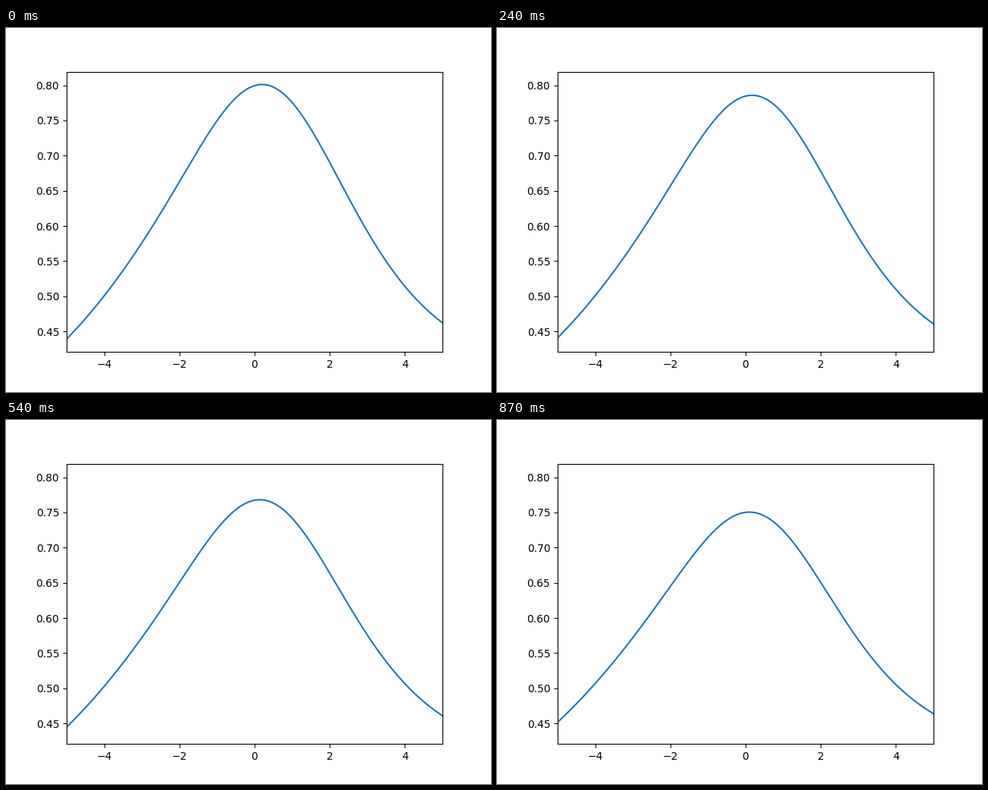
Recreate the animation shown at these times as a matplotlib script. Size 640 px wide and 480 px high, loop 0.9 s.

```python
import numpy as np
import matplotlib.pyplot as plt
from matplotlib.animation import FuncAnimation

FRAMES = 30


def curve(x, t):
    """Bell with slow tails that sinks and widens as t goes from 0 to 1."""
    base = 0.2737 + 0.0155 * t + 0.0139 * t**2
    height = 0.5275 - 0.0732 * t - 0.0069 * t**2
    width2 = 12.8 + 0.72 * t - 0.19 * t**2
    d = x - (0.2 - 0.1 * t)
    drop = d**2 / (width2 + d**2)
    skew = 0.0234 * np.sin(np.pi * d / 4.8)
    return base + height - drop * (height + skew)


x = np.linspace(-5, 5, 300)

plt.rcParams["font.family"] = "DejaVu Sans"
fig, ax = plt.subplots(figsize=(6.4, 4.8), dpi=100)
line, = ax.plot(x, curve(x, 0), color="#1f77b4", lw=1.5)
ax.set_xlim(-5, 5)
ax.set_ylim(0.42072, 0.81942)
ax.set_xticks(range(-4, 5, 2))
ax.set_yticks(np.arange(0.45, 0.81, 0.05))


def update(i):
    line.set_ydata(curve(x, i / (FRAMES - 1)))
    return line,


anim = FuncAnimation(fig, update, frames=FRAMES, interval=30,
                     repeat=True, repeat_delay=0)
plt.show()
```
